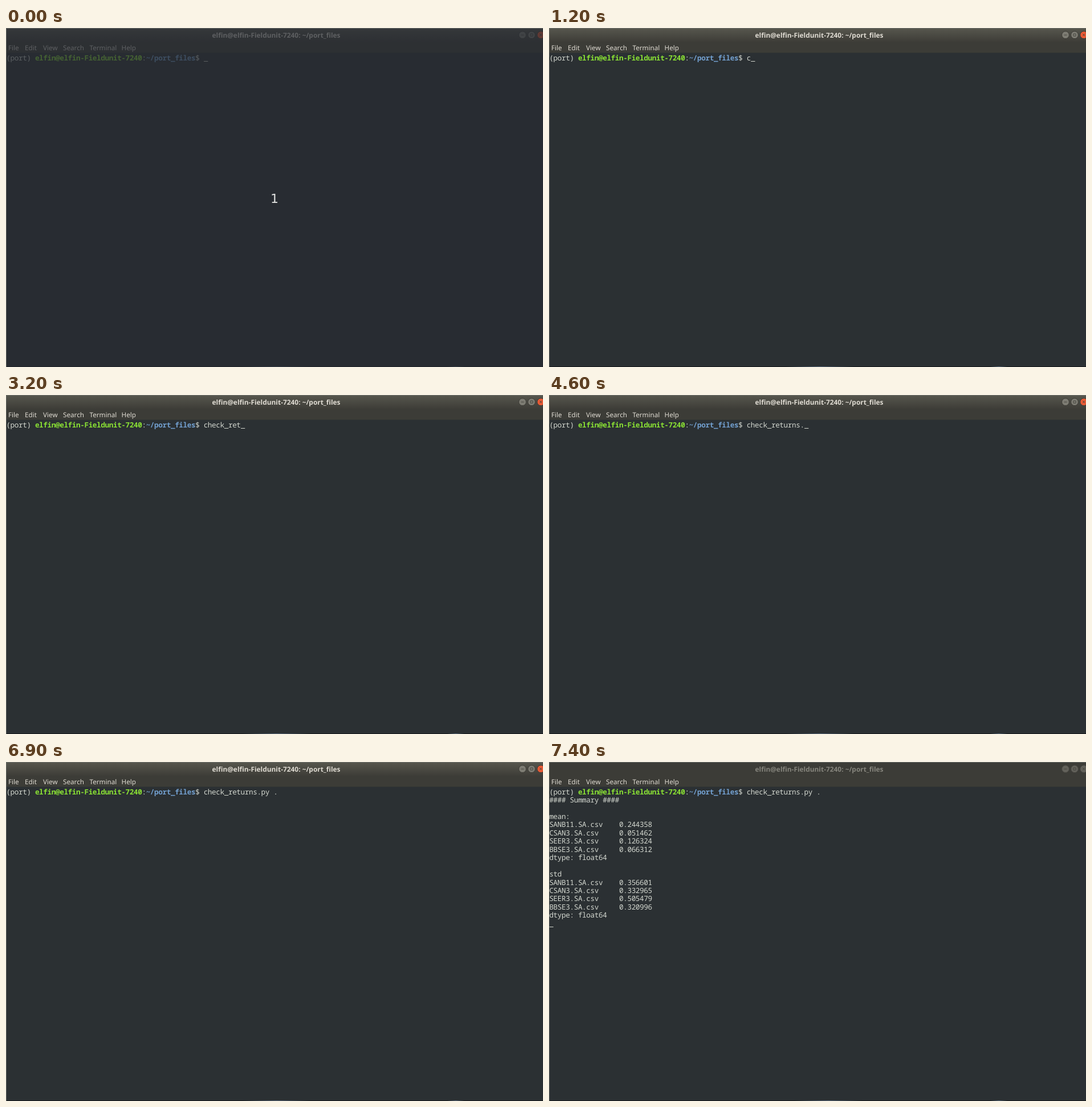
Write an HTML page that moves like this. It is 942 px wide and 595 px high and loops after 8 s.

```html
<!DOCTYPE html>
<html lang="en">
<head>
<meta charset="utf-8">
<title>Terminal</title>
<style>
  html, body { margin: 0; width: 100%; height: 100%; overflow: hidden; background: #2b3033; }
  svg { display: block; width: 942px; height: 595px; }
  text { white-space: pre; text-rendering: geometricPrecision; }
  .ui { font: 11.7px "Noto Sans", "Open Sans", sans-serif; fill: #dfdbd2; }
  .title { font-size: 11.9px; font-weight: 700; text-anchor: middle; }
  .mono { font: 12.7px "Noto Sans Mono", "DejaVu Sans Mono", monospace; letter-spacing: -.4px; fill: #d3d7cf; }
  .user { fill: #8ae234; font-weight: 700; }
  .path { fill: #729fcf; font-weight: 700; }
  .count { font: 22px "DejaVu Sans", sans-serif; fill: #e2e4e2; text-anchor: middle; }
</style>
</head>
<body>
<svg viewBox="0 0 942 595">
  <defs>
    <linearGradient id="bar" x1="0" y1="0" x2="0" y2="1">
      <stop offset="0" stop-color="#57574e"/>
      <stop offset="1" stop-color="#3d3c37"/>
    </linearGradient>
    <linearGradient id="glow">
      <stop offset="0" stop-color="#56677a" stop-opacity="0"/>
      <stop offset=".5" stop-color="#56677a"/>
      <stop offset="1" stop-color="#56677a" stop-opacity="0"/>
    </linearGradient>
  </defs>

  <rect width="942" height="595" fill="#2b3033"/>
  <rect width="942" height="43.5" fill="#3c3c37"/>
  <rect id="titleBar" width="942" height="25" fill="url(#bar)"/>
  <text id="title" class="ui title" x="474" y="16.5"></text>
  <g id="buttons" stroke-width="1">
    <circle cx="906" cy="12.2" r="6.4"/>
    <circle cx="922" cy="12.2" r="6.4"/>
    <circle id="close" cx="938.2" cy="12.2" r="6.4"/>
    <path d="M903.5 12.3h5M920 10.2h4v4h-4zM936.2 10.2l4 4m0-4l-4 4" fill="none" stroke="#45443e"/>
  </g>
  <g id="menu" class="ui"></g>

  <text id="prompt" class="mono" x=".4" y="56.6"></text>
  <g id="output" class="mono"></g>
  <rect id="cursor" width="7.3" height="1" fill="#d3d7cf"/>

  <rect y="594" width="942" height="1" fill="#15191b"/>
  <rect id="glowWide" y="594" width="120" height="1" fill="url(#glow)"/>
  <rect x="774" y="594" width="30" height="1" fill="url(#glow)"/>

  <g id="countdown">
    <rect width="942" height="595" fill="#272b33" opacity=".7"/>
    <text class="count" x="471" y="306.5">1</text>
  </g>
  <path d="M0 .5H942M.5 1V595" stroke="#70746f" fill="none" opacity=".85"/>
</svg>

<script>
const LOOP = 8000, CELL = 7.22, LINE = 14.45, LEFT = .4, BASE = 56.6;
const USER = "elfin@elfin-Fieldunit-7240", PATH = "~/port_files";
const COMMAND = "check_returns.py .";
const PROMPT_CELLS = `(port) ${USER}:${PATH}$ `.length;

// When each character of the command is echoed.
const KEY_TIMES = [1200, 1300, 1400, 1700, 2000, 2600, 2800, 2900, 3200,
                   3300, 3500, 3600, 3700, 4600, 4800, 5100, 5900, 6100];
const CURSOR_OFF = [[600, 1100], [4300, 4500], [5700, 5800], [6900, 7400]];
const ENTER = 6300, MEAN = 7100, STD = 7200, BLUR = 7400;

const $ = id => document.getElementById(id);

function addText(parent, x, y, content) {
  const node = document.createElementNS("http://www.w3.org/2000/svg", "text");
  node.setAttribute("x", x);
  node.setAttribute("y", y);
  node.textContent = content;
  parent.append(node);
  return node;
}

const FILES = ["SANB11.SA.csv", "CSAN3.SA.csv", "SEER3.SA.csv", "BBSE3.SA.csv"];
const series = (label, values) => [
  label,
  ...FILES.map((file, i) => file.padEnd(17) + values[i]),
  "dtype: float64"
];
const LINES = [
  "#### Summary ####", "",
  ...series("mean:", ["0.244358", "0.051462", "0.126324", "0.066312"]), "",
  ...series("std", ["0.356601", "0.332965", "0.505479", "0.320996"])
];
const STD_ROW = LINES.indexOf("std");

$("title").textContent = `${USER}: ${PATH}`;
[["File", 4], ["Edit", 33], ["View", 65], ["Search", 100], ["Terminal", 146.5], ["Help", 202.5]]
  .forEach(([label, x]) => addText($("menu"), x, 39, label));

$("prompt").innerHTML = `(port) <tspan class="user">${USER}</tspan>:` +
  `<tspan class="path">${PATH}</tspan>$ <tspan id="typed"></tspan>`;
const rows = LINES.map((line, i) => addText($("output"), LEFT, BASE + LINE * (i + 1), line));

const show = (node, on) => node.setAttribute("visibility", on ? "visible" : "hidden");

function render(t) {
  const count = KEY_TIMES.filter(time => time <= t).length;
  $("typed").textContent = COMMAND.slice(0, count);
  rows.forEach((row, i) => show(row, t >= (i < STD_ROW ? MEAN : STD)));

  const cursorRow = t < ENTER ? 0 : t < BLUR ? 1 : LINES.length + 1;
  const cursorCell = t < ENTER ? PROMPT_CELLS + count : 0;
  $("cursor").setAttribute("x", LEFT + cursorCell * CELL);
  $("cursor").setAttribute("y", Math.round(58 + cursorRow * LINE));
  show($("cursor"), !CURSOR_OFF.some(([from, to]) => t >= from && t < to));

  const focused = t < BLUR;
  $("titleBar").setAttribute("fill", focused ? "url(#bar)" : "#3c3c37");
  $("title").style.fill = focused ? "#dfdbd2" : "#86857d";
  $("buttons").setAttribute("fill", focused ? "#7d7c73" : "#62615a");
  $("buttons").setAttribute("stroke", focused ? "#3a3934" : "#45443f");
  $("close").setAttribute("fill", focused ? "#ec5b35" : "#62615a");

  $("glowWide").setAttribute("x", t < STD ? 415 : 430);
  show($("countdown"), t < 200);
}

const start = performance.now();
function tick() {
  render((performance.now() - start) % LOOP);
  requestAnimationFrame(tick);
}
tick();
</script>
</body>
</html>
```
